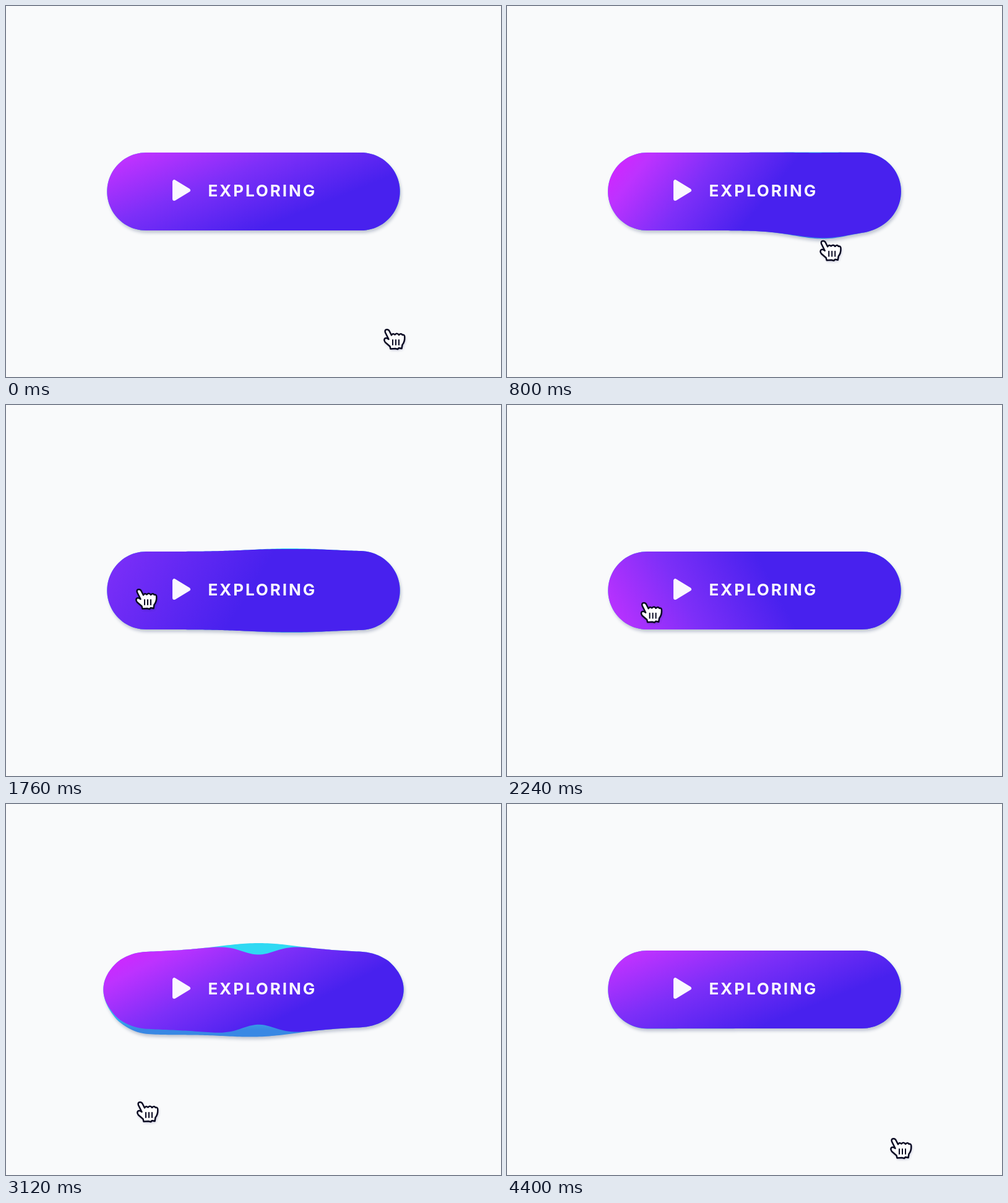
An HTML page with a canvas that plays this animation: 800x600 px, repeating every 4480 ms.

```html
<!DOCTYPE html>
<html lang="en">
<head>
<meta charset="utf-8">
<title>Liquid button</title>
<style>
  html, body { margin: 0; width: 100%; height: 100%; overflow: hidden; background: #f9fafb; }
  canvas { display: block; }
</style>
</head>
<body>
<canvas id="stage" width="800" height="600"></canvas>
<script>
const ctx = document.getElementById('stage').getContext('2d');
const LOOP = 4480, STEP = 80;
const CX = 400, CY = 300, HALF = 236.7, R = 63;

// Pointer stops: time, left, top
const pointer = [
  [0, 610, 522], [400, 509, 313], [860, 505, 382], [1200, 495, 289],
  [1760, 209, 297], [2320, 216, 320], [2560, 221, 384], [2780, 216, 482],
  [3120, 211, 481], [3880, 619, 541], [4400, 619, 540], [LOOP, 610, 522]
];

// Gradient: time, angle, where it ends past the centre, length
const sheen = [
  [0, 68, 60, 245], [400, 48, -8, 225], [1200, 29, 51, 280], [1760, 32, -4, 560],
  [2560, -60, 50, 230], [3120, 63, 62, 235], [3840, 68, 60, 245], [LOOP, 68, 60, 245]
];

// The lower edge follows the pointer, then lets go: time, x, amount
const pulls = [[400, 510, 16], [880, 512, 20], [2560, 236, 46]];

// Both edges swell and ring; the front layer pinches in the middle:
// time, x, amount, pinch
const swells = [
  [400, 490, 6, .1], [720, 500, 11, 1.4], [1200, 472, 5, 1.7],
  [1760, 460, 5, .2], [3120, 408, 12, 1.55]
];

const bell = (d, width) => Math.exp(-d * d / (2 * width * width));

function at(keys, t) {
  const i = keys.findIndex(k => k[0] > t);
  const a = keys[i - 1], b = keys[i];
  const u = (t - a[0]) / (b[0] - a[0]), k = u * u * (3 - 2 * u);
  return a.slice(1).map((v, j) => v + (b[j + 1] - v) * k);
}

// Stronger pulls reach further inwards and last longer; the back layer lags.
function pullAt(x, t, front) {
  let sum = 0;
  for (const [peak, px, amount] of pulls) {
    const age = t - peak;
    const power = age < 0 ? bell(age, 80) : Math.exp(-age / (amount * (front ? 4.3 : 8.5)));
    const inwards = (x - px) * (CX - px) > 0;
    sum += amount * power * bell(x - px, inwards ? 20 + 1.4 * amount : 40);
  }
  return sum;
}

const ringing = age => bell(age, 150) * Math.cos(2 * Math.PI * age / 330);

function swellAt(x, t, front) {
  let sum = 0;
  for (const [peak, sx, amount, pinch] of swells) {
    const shape = bell(x - sx, 62) - (front ? pinch * bell(x - sx, 28) : 0);
    sum += amount * ringing(t - peak) * shape;
  }
  return sum;
}

// Strong swells push the ends outwards.
const stretchAt = t => swells.reduce(
  (sum, [peak, , amount]) => sum + Math.max(0, amount - 6) * ringing(t - peak), 0);

// Walks round the pill as [x, y, normal x, normal y].
const pill = [];
for (const side of [1, -1]) {
  const end = side * (HALF - R);
  for (let x = -end; side * x < side * end; x += side * 4)
    pill.push([CX + x, CY - side * R, 0, -side]);
  for (let i = 0; i <= 48; i++) {
    const a = Math.PI * (i / 48 - side / 2);
    const nx = Math.cos(a), ny = Math.sin(a);
    pill.push([CX + end + R * nx, CY + R * ny, nx, ny]);
  }
}

function outline(t, front) {
  const path = new Path2D(), stretch = stretchAt(t);
  const soft = n => Math.max(-1, Math.min(1, n * 1.6));
  for (const [x, y, nx, ny] of pill) {
    const thin = .9 * stretch * Math.abs((x - CX) / HALF) ** 3;
    let out = swellAt(x, t, front) - thin;
    if (ny > 0) out += pullAt(x, t, front);
    path.lineTo(x + stretch * soft(nx), y + out * soft(ny));
  }
  path.closePath();
  return path;
}

function shadow(color, blur, x, y) {
  ctx.shadowColor = color;
  ctx.shadowBlur = blur;
  ctx.shadowOffsetX = x;
  ctx.shadowOffsetY = y;
}
const noShadow = () => shadow('transparent', 0, 0, 0);

function gradient(x0, y0, x1, y1, ...stops) {
  const g = ctx.createLinearGradient(x0, y0, x1, y1);
  for (const [offset, color] of stops) g.addColorStop(offset, color);
  return g;
}

const backFill = gradient(0, 325, 0, 365, [0, '#30d9f3'], [1, '#3888e4']);

function frontFill(t) {
  const [angle, end, length] = at(sheen, t), a = angle * Math.PI / 180;
  const along = d => [CX + d * Math.cos(a), CY + d * Math.sin(a)];
  return gradient(...along(end - length), ...along(end),
    [0, '#de1eff'], [.25, '#bd32ff'], [.6, '#7d2ff8'], [1, '#4821ee']);
}

const triangle = new Path2D('M272 284V312L295 298Z');
const hand = new Path2D(
  'M3 6Q1.5 1.5 5.5 1.2Q8.5 1 9.7 4L13 10.5Q15 6.5 18.5 9.5' +
  'Q22.5 6 25 10Q28.5 6.5 30.5 10Q34.5 9 34.3 14Q34.5 21 30.5 26' +
  'L29.5 32L25 31L23 33L19 32L11.5 32.5L10.5 28.5L3 22Q0 18 2.5 15.5' +
  'Q5 14 8.5 17Z');
const fingers = new Path2D('M15 18V26M20 18V26M25 18V26');

function drawHand(x, y) {
  ctx.save();
  ctx.translate(x, y);
  ctx.lineJoin = ctx.lineCap = 'round';
  ctx.strokeStyle = '#090922';
  ctx.fillStyle = '#fff';
  ctx.lineWidth = 2.5;
  shadow('rgba(20,20,90,.3)', 4, 1, 2);
  ctx.fill(hand);
  noShadow();
  ctx.stroke(hand);
  ctx.lineWidth = 2;
  ctx.stroke(fingers);
  ctx.restore();
}

function draw(t) {
  ctx.fillStyle = '#f9fafb';
  ctx.fillRect(0, 0, 800, 600);

  shadow('rgba(10,30,80,.24)', 5, 2, 4);
  ctx.fillStyle = backFill;
  ctx.fill(outline(t, false));
  noShadow();
  ctx.fillStyle = frontFill(t);
  ctx.fill(outline(t, true));

  ctx.fillStyle = ctx.strokeStyle = '#faf8ff';
  ctx.lineJoin = 'round';
  ctx.lineWidth = 6;
  ctx.fill(triangle);
  ctx.stroke(triangle);
  ctx.font = '700 26px Inter, "Liberation Sans", sans-serif';
  ctx.letterSpacing = '2.9px';
  ctx.fillText('EXPLORING', 326.4, 307.5);

  drawHand(...at(pointer, t));
}

const start = performance.now();
function tick() {
  const t = (performance.now() - start) % LOOP;
  draw(Math.floor(t / STEP) * STEP);
  requestAnimationFrame(tick);
}
tick();
</script>
</body>
</html>
```
